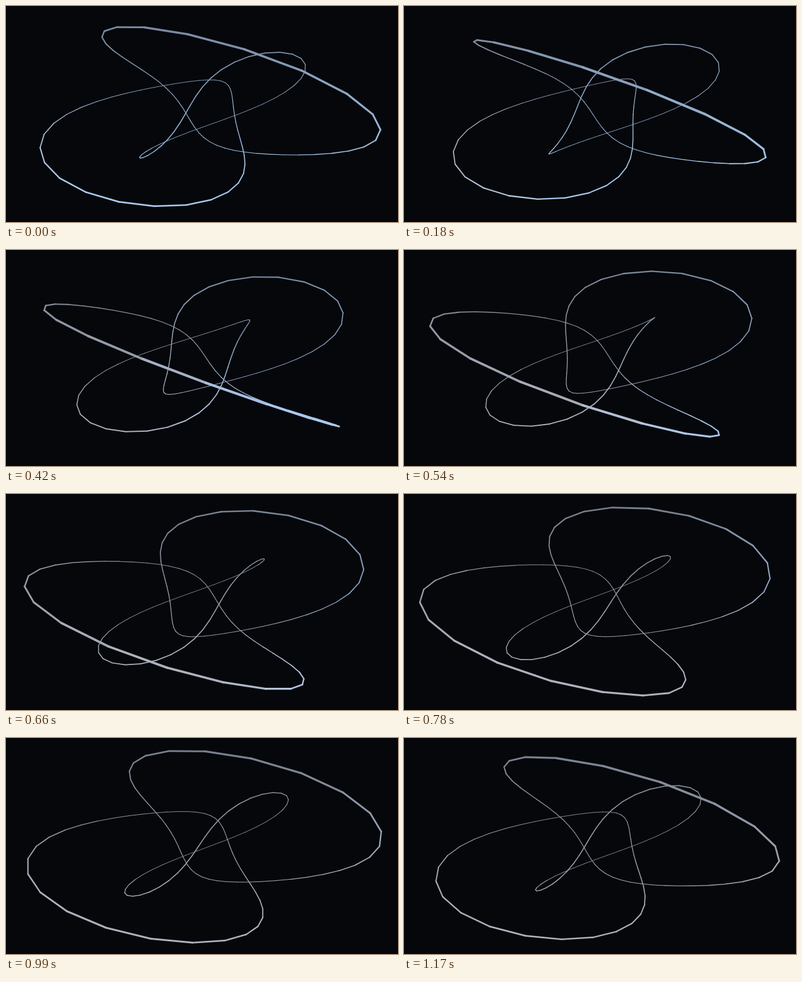
Animation, 650 px wide and 360 px high, one loop 1.2 s. Source, as an HTML page with a canvas:

```html
<!DOCTYPE html>
<html>
<head>
<meta charset="utf-8">
<style>
  html, body { margin: 0; width: 650px; height: 360px; overflow: hidden; background: #05070b; }
  canvas { display: block; }
</style>
</head>
<body>
<canvas id="stage" width="650" height="360"></canvas>
<script>
const ctx = document.getElementById('stage').getContext('2d');
const LOOP = 1200, STEP = 30;
const RINGS = 3, POINTS = 40;
const TUBE = 0.6;                   // tube radius, torus radius is 1
const FOCAL = 310, CAMERA = 2.303;  // perspective
const RAD = Math.PI / 180;

const clamp = v => Math.max(0, Math.min(1, v));
const mix = (a, b, k) => a.map((v, i) => v + (b[i] - v) * k);

const GREY = [[114, 123, 137], [173, 178, 189]];
const BLUE = [[112, 127, 148], [170, 201, 238]];
const SHINE = [215, 228, 245];

// Each strand winds once around the torus and once around its tube.
function project(psi, spin) {
  const rho = 1 + TUBE * Math.cos(psi);
  const scale = FOCAL / (CAMERA - rho * Math.cos(spin + psi));
  return {
    x: 325.5 + rho * Math.sin(spin + psi) * scale,
    y: 180.5 + TUBE * Math.sin(psi) * scale,
    scale
  };
}

// Lighter towards the bottom; the blue tint retreats to the right with a soft shine at its edge.
function tint(x, y, progress) {
  const light = clamp(y / 270);
  const edge = -50 + 750 * progress;
  const blue = clamp((x - edge) / 200);
  const shine = 0.25 * light * (1 - Math.abs(2 * blue - 1));
  const base = mix(mix(...GREY, light), mix(...BLUE, light), blue);
  return `rgb(${mix(base, SHINE, shine).map(Math.round)})`;
}

function draw(time) {
  ctx.fillStyle = '#05070b';
  ctx.fillRect(0, 0, 650, 360);
  ctx.lineCap = 'round';
  for (let ring = 0; ring < RINGS; ring++) {
    const spin = (33.5 - 120 * ring - 120 * time / LOOP) * RAD;
    let a = project(0, spin);
    for (let i = 1; i <= POINTS; i++) {
      const b = project(i / POINTS * 2 * Math.PI, spin);
      ctx.strokeStyle = tint((a.x + b.x) / 2, (a.y + b.y) / 2, time / LOOP);
      ctx.lineWidth = (a.scale + b.scale) / 2 * 0.0098;
      ctx.beginPath();
      ctx.moveTo(a.x, a.y);
      ctx.lineTo(b.x, b.y);
      ctx.stroke();
      a = b;
    }
  }
}

const start = performance.now();
function frame() {
  const time = (performance.now() - start) % LOOP;
  draw(Math.floor(time / STEP) * STEP);
  requestAnimationFrame(frame);
}
frame();
</script>
</body>
</html>
```
